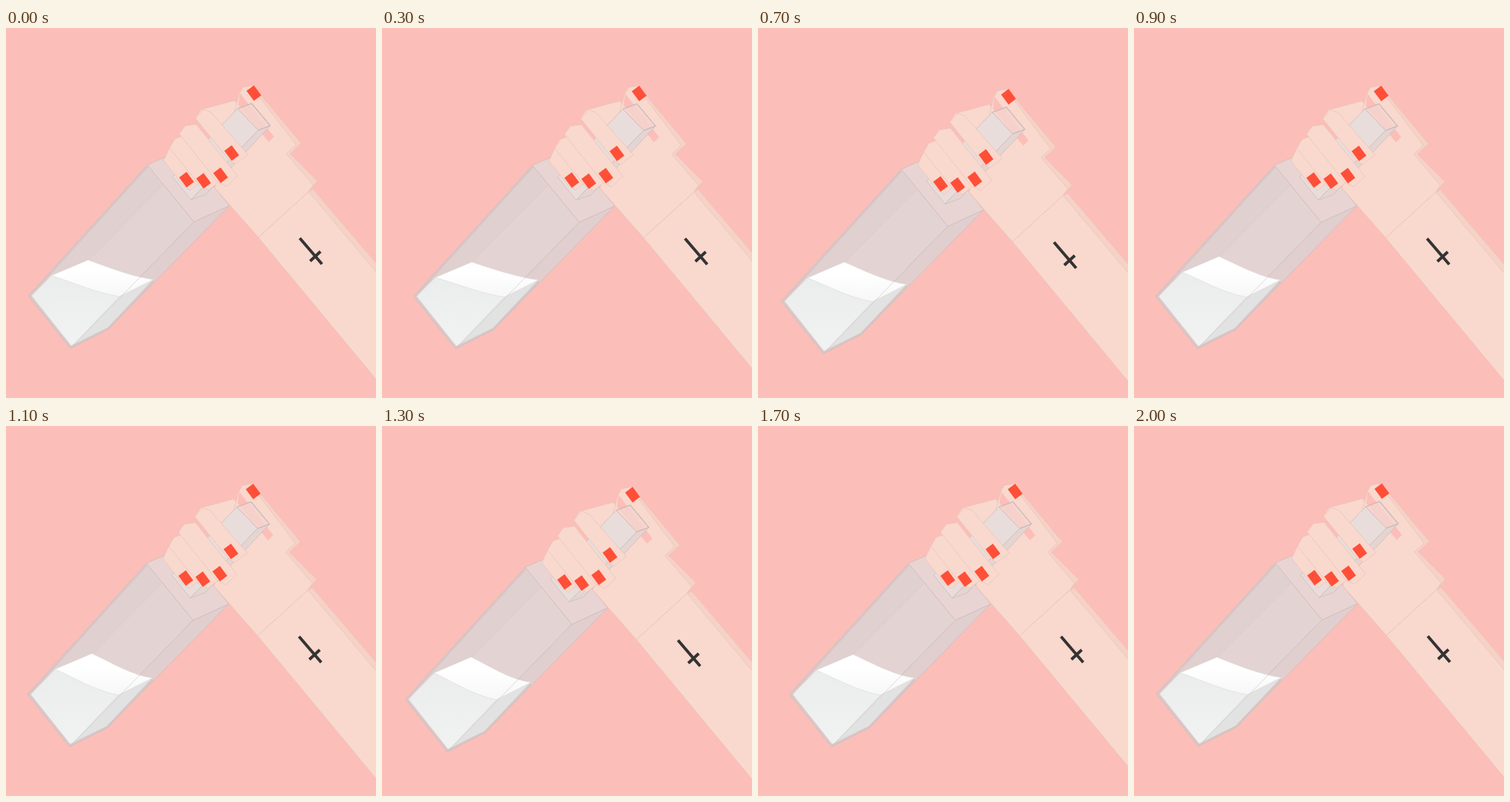
These frames come from a looping animation (500x500 px, 2.1 s). An HTML page:

```html
<!DOCTYPE html>
<html lang="en">
<head>
<meta charset="utf-8">
<title>Bottle shake</title>
<style>
  html, body { margin: 0; width: 100%; height: 100%; overflow: hidden; background: #fcbeb8; }
  svg { display: block; width: 100vw; height: 100vh; }
  .skin { fill: #f9d8cd; stroke: #e6c3b8; stroke-width: .7; stroke-linejoin: round; }
  .side { fill: #f6d1c6; stroke: #e6c3b8; stroke-width: .7; }
  .nail { fill: #ff4f38; }
  .glass { stroke: #cdbdbc; stroke-width: .8; stroke-linejoin: round; }
  .mark { fill: none; stroke: #333; stroke-width: 4; }
</style>
</head>
<body>
<svg viewBox="0 0 500 500">
  <defs>
    <linearGradient id="milk" x1="0" y1="0" x2="0" y2="1">
      <stop offset="0" stop-color="#ebecec"/><stop offset="1" stop-color="#f1f2f2"/>
    </linearGradient>
    <linearGradient id="surface" x1="0" y1="0" x2="0" y2="1">
      <stop offset=".3" stop-color="#fff"/><stop offset="1" stop-color="#f7f7f7"/>
    </linearGradient>
    <path id="nail" class="nail" d="M-10-3 0-10.5 10 3 0 10.5Z"/>
  </defs>
  <g id="scene">
    <!-- bottle body -->
    <path class="glass" fill="#e4d3d3" d="M30 362 191 185 254 262 87 433Z"/>
    <path class="glass" fill="#e0d0cf" stroke-opacity=".3" d="M30 362 191 185 213 211 111 314 62 335Z"/>
    <path class="glass" fill="#e0cfce" d="M254 262 302 240 138 407 87 433Z"/>
    <path class="glass" fill="#e9d4d4" d="M191 185 239 164 302 240 254 262Z"/>
    <!-- liquid -->
    <path id="front" fill="url(#milk)"/>
    <path fill="#e2e2e2" d="M153 363 199 340 138 405 89 430Z"/>
    <path id="top" fill="url(#surface)" stroke="#dedede" stroke-width=".6"/>
    <path fill="none" stroke="#cfcaca" stroke-width=".7" d="M254 262 87 433"/>
    <path fill="none" stroke="#d2c0c0" stroke-opacity=".6" stroke-width="3" d="M191 187 32 362 87 431 138 406 199 342"/>

    <!-- arm and palm -->
    <path class="side" d="M409 221 415 218 620 458 620 480Z"/>
    <path class="skin" d="M341 283 409 221 620 472 620 619Z"/>
    <path class="skin" d="M256 121 264 110 309 98 315 106 300 135Z"/>
    <path class="side" d="M320 80 333 77 399 156 384 170 421 207 409 221 376 178Z"/>
    <path class="skin" d="M282 216 300 150 315 89 320 80 331 78 392 158 379 170 415 212 409 221 341 283Z"/>
    <path fill="#fcbeb8" d="M314 104 316 88 362 147 355 154Z"/>
    <use href="#nail" x="335" y="88"/>

    <!-- neck -->
    <path class="glass" fill="#e8dddb" d="M313 109 341 138 250 232 225 201Z"/>
    <path class="glass" fill="#e4d5d2" d="M341 138 357 132 270 225 250 232Z"/>
    <path class="glass" fill="#f5d5cf" fill-opacity=".8" d="M313 109 332 102 357 132 341 138Z"/>
    <path fill="none" stroke="#c8bab8" stroke-width="1.2" d="M313 109 332 102 357 132 341 138"/>

    <!-- fingers -->
    <path class="skin" d="M213 179 221 162 234 164 267 204 249 219 240 213Z"/>
    <path class="skin" d="M221 162 228 150 241 145 290 206 274 219 262 213Z"/>
    <path class="skin" d="M234 143 242 132 257 130 313 200 298 214 286 208Z"/>
    <path class="skin" d="M256 122 267 110 277 114 327 171 310 184 301 178Z"/>
    <use href="#nail" x="244" y="205"/>
    <use href="#nail" x="267" y="206.5"/>
    <use href="#nail" x="290" y="199"/>
    <use href="#nail" x="305" y="169"/>
    <path class="mark" d="M397 284 427 319M411 315 425 302"/>
  </g>
</svg>
<script>
const $ = id => document.getElementById(id);
const STEP = 100, COUNT = 21;

// One orbit of the hand, run forward and then back.
const orbit = [[0, 0], [3.5, -.4], [8, -.3], [12.5, .5], [17.5, 3.5], [20, 8],
               [13, 8.5], [3, 5.5], [-1.3, 2.6], [-1, .5], [-.4, .3]];
// Liquid level along the bottle: [step, rise]
const levels = [[0, 0], [3, -2], [5, 2.5], [9, 5], [13, 7.5], [17, 5], [20, 1]];

function levelAt(n) {
  const i = Math.max(1, levels.findIndex(k => k[0] >= n));
  const [a, from] = levels[i - 1], [b, to] = levels[i];
  return from + (to - from) * (n - a) / (b - a);
}

function draw(now) {
  const n = Math.floor(now / STEP) % COUNT;
  const [x, y] = orbit[n <= 10 ? n : 20 - n];
  // Slight stretch along the bottle's axis
  const k = .0015 * y;
  $('scene').setAttribute('transform',
    `matrix(${1 + .45 * k} ${-.5 * k} ${-.5 * k} ${1 + .55 * k} ${x - 37.5 * k} ${y + 41 * k})`);

  const s = levelAt(n), left = `${61.5 + s} ${334.5 - s * 1.05}`;
  const wave = `C${86 + s} ${342 - s / 2} ${118 + s / 2} 357 153 363`;
  $('front').setAttribute('d', `M35 362L${left}${wave}L89 430Z`);
  $('top').setAttribute('d', `M${left}${wave}L199 340C172 336 ${144 + s} ${326 - s / 2} ${111 + s} ${313.5 - s * 1.05}Z`);
  requestAnimationFrame(draw);
}
requestAnimationFrame(draw);
</script>
</body>
</html>
```
